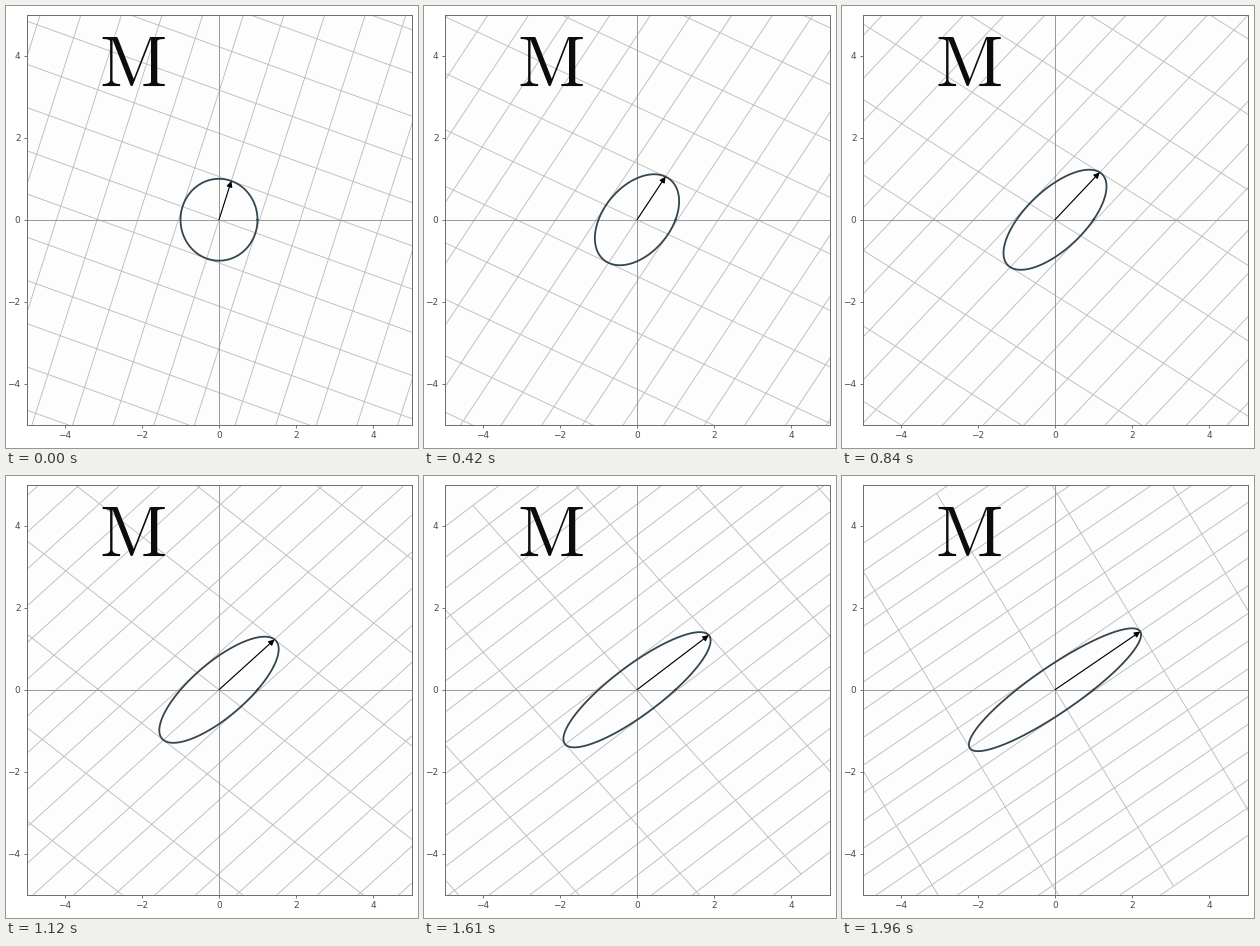
A matplotlib script that plays this animation: 412x442 px, repeating every 2.1 s.

```python
import numpy as np
import matplotlib.pyplot as plt
from matplotlib.animation import FuncAnimation
from matplotlib.collections import LineCollection

W, H, DPI = 412, 442, 100
FRAMES, INTERVAL = 30, 70
STEPS = 27
REACH = 10
PT = 72 / DPI  # points per pixel

plt.rcParams["font.family"] = "DejaVu Sans"
plt.rcParams["mathtext.fontset"] = "cm"

A = np.array([[1.0, 2.0], [0.0, 1.5]])
V = np.linalg.svd(A)[2][0]
V = V * np.sign(V[1])
N = np.array([V[1], -V[0]])

# Grid aligned with the right singular vectors of A
ks = np.arange(-REACH, REACH + 1)
GRID = np.array(
    [[k * V - REACH * N, k * V + REACH * N] for k in ks]
    + [[k * N - REACH * V, k * N + REACH * V] for k in ks]
)
theta = np.linspace(0, 2 * np.pi, 241)
CIRCLE = np.array([np.cos(theta), np.sin(theta)])


def matrix(i):
    """Blend from the identity to A, with the short holds of the playback."""
    if i < 12:
        step = i - (i % 3 == 2)
    else:
        step = i - (i >= 20) - (i == FRAMES - 1)
    t = step / STEPS
    return (1 - t) * np.eye(2) + t * A


fig = plt.figure(figsize=(W / DPI, H / DPI), dpi=DPI, facecolor="white")
left, right, top, bottom = 20.5, 405.5, 9, 418.5
ax = fig.add_axes([left / W, 1 - bottom / H, (right - left) / W, (bottom - top) / H])
ax.set(xlim=(-5, 5), ylim=(-5, 5), facecolor="#fdfdfe")
ax.set_xticks(range(-4, 5, 2))
ax.set_yticks(range(-4, 5, 2))
ax.tick_params(length=3 * PT, width=0.8 * PT, pad=3 * PT, labelsize=9 * PT,
               color="#555555", labelcolor="#4a4a4a")
for spine in ax.spines.values():
    spine.set(color="#707070", linewidth=1 * PT)

grid = LineCollection([], colors="#bdbdbd", linewidths=0.9 * PT, zorder=1)
ax.add_collection(grid, autolim=False)
ax.axhline(0, color="#9a9a9a", lw=1 * PT, zorder=2)
ax.axvline(0, color="#9a9a9a", lw=1 * PT, zorder=2)
ellipse, = ax.plot([], [], color="#33454f", lw=1.8 * PT, zorder=3)
arrow = ax.annotate(
    "", xy=V, xytext=(0, 0), zorder=4,
    arrowprops=dict(arrowstyle="-|>,head_length=0.4,head_width=0.2",
                    mutation_scale=12 * PT, shrinkA=0, shrinkB=0,
                    color="black", lw=1.1 * PT))
ax.text(-2.25, 3.25, r"$\mathrm{M}$", fontsize=73.5 * PT, color="#0c0c0c",
        ha="center", va="baseline", zorder=5)


def update(i):
    m = matrix(i)
    grid.set_segments(GRID @ m.T)
    ellipse.set_data(*(m @ CIRCLE))
    arrow.xy = m @ V
    return grid, ellipse, arrow


anim = FuncAnimation(fig, update, frames=FRAMES, interval=INTERVAL,
                     repeat=True, repeat_delay=0, blit=False)
plt.show()
```
